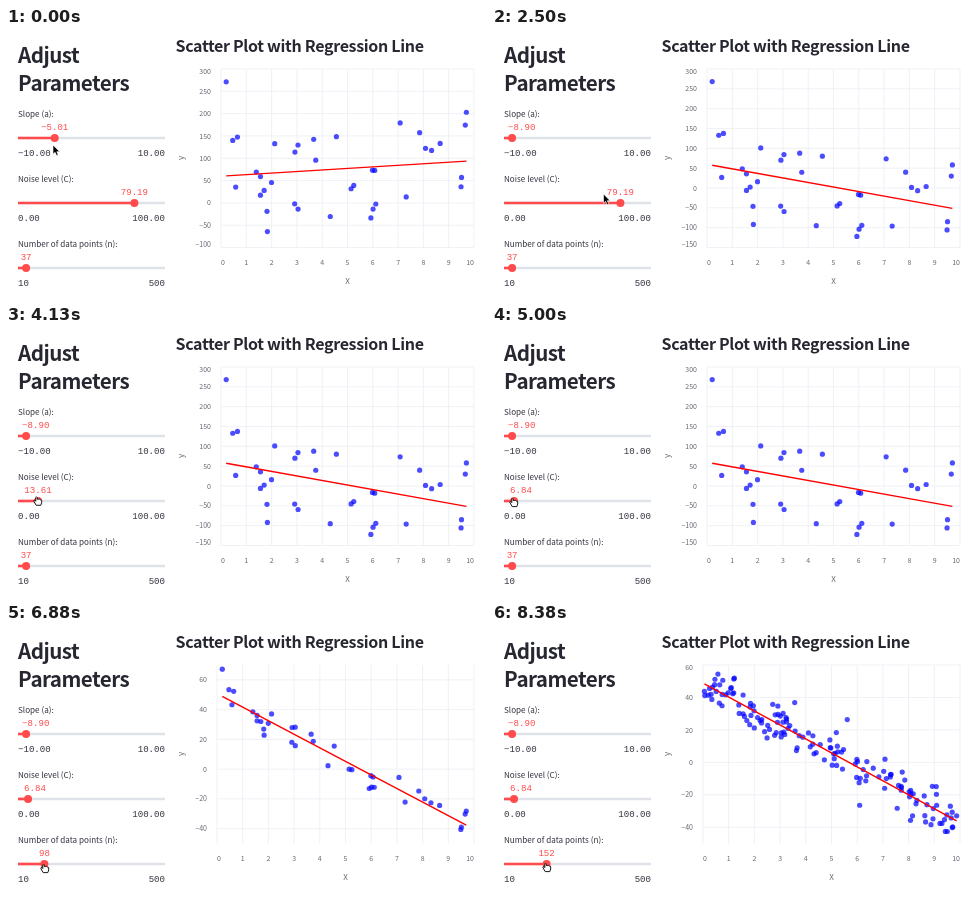
An HTML page that plays this animation: 480x270 px, repeating every 9010 ms.

```html
<!DOCTYPE html>
<html lang="en">
<head>
<meta charset="utf-8">
<title>Scatter Plot with Regression Line</title>
<style>
  html, body { margin: 0; width: 100%; height: 100%; overflow: hidden; background: #fff; }
  svg { display: block; width: 480px; height: 270px; }
  text { font: 8.15px "Noto Sans CJK JP", "Noto Sans CJK SC", "Noto Sans CJK", sans-serif; fill: #31333f; }
  .heading { font-size: 20.6px; font-weight: 700; letter-spacing: -.025em; fill: #262730; }
  .title { font-size: 16px; font-weight: 700; letter-spacing: -.02em; fill: #262730; }
  .mono { font: 9.1px "Liberation Mono", monospace; }
  .value { fill: #ff4b4b; }
  .tick { font-size: 7px; fill: #666975; }
  .name { font-size: 8.1px; fill: #666975; }
</style>
</head>
<body>
<svg viewBox="0 0 480 270">
  <text class="heading" x="12" y="35">Adjust</text>
  <text class="heading" x="12" y="63">Parameters</text>
  <text class="title" x="169.5" y="24">Scatter Plot with Regression Line</text>
  <g id="chart"></g>
  <g id="sliders"></g>
  <g id="cursor"></g>
</svg>
<script>
const LOOP = 9010, STEP = 125;
const TOP = 41, BOTTOM = 219.5, RIGHT = 468;
const TRACK_LEFT = 12, TRACK_WIDTH = 147, THUMB = 4, CHAR = 5.46;

// Keys are [time, value...]
const slopeKeys = [[0, -5.01], [500, -8.63], [1250, -8.63], [1500, -8.9]];
const noiseKeys = [[3000, 79.19], [3500, 44.78], [4000, 17], [4375, 6.84]];
const countKeys = [[6125, 37], [6750, 98], [6875, 98], [7250, 152]];
const cursorKeys = [
  [0, 47, 117], [500, 22, 114], [1250, 22, 114], [1500, 20, 114], [1875, 22, 115], [2000, 29, 117],
  [2500, 111.5, 166], [2875, 128, 171], [3000, 128, 171], [3500, 77, 171], [4000, 37, 174],
  [4375, 22, 176], [5250, 22, 176], [5875, 20, 242], [6125, 20, 243], [6750, 39, 244],
  [6875, 39, 244], [7250, 55, 243]
];
// The chart lags behind the sliders: [time, slope, noise, count]
const charts = [
  [0, 6.04, 79.19, 37], [1125, -8.63, 79.19, 37], [2250, -8.9, 79.19, 37],
  [5250, -8.9, 6.84, 37], [7500, -8.9, 6.84, 98], [8250, -8.9, 6.84, 152]
];

function tween(keys, t) {
  const i = keys.findIndex(key => key[0] > t);
  if (i === 0) return keys[0].slice(1);
  if (i < 0) return keys[keys.length - 1].slice(1);
  const a = keys[i - 1], b = keys[i], p = (t - a[0]) / (b[0] - a[0]);
  return a.slice(1).map((v, k) => v + (b[k + 1] - v) * p);
}

const text = (x, y, str, cls = '', anchor = 'start') =>
  `<text x="${x}" y="${y}" class="${cls}" text-anchor="${anchor}">${str}</text>`;
const line = (x1, y1, x2, y2, stroke, width) =>
  `<line x1="${x1}" y1="${y1}" x2="${x2}" y2="${y2}" stroke="${stroke}" stroke-width="${width}"/>`;
const minus = str => String(str).replace('-', '−');

// Mersenne Twister giving doubles in [0, 1)
function mersenne(seed) {
  const s = [seed];
  for (let i = 1; i < 624; i++)
    s[i] = (Math.imul(1812433253, s[i - 1] ^ (s[i - 1] >>> 30)) + i) >>> 0;
  let k = 0;
  const next = () => {
    let y = (s[k] & 0x80000000) | (s[(k + 1) % 624] & 0x7fffffff);
    y = s[k] = s[(k + 397) % 624] ^ (y >>> 1) ^ (y & 1 ? 0x9908b0df : 0);
    k = (k + 1) % 624;
    y ^= y >>> 11;
    y ^= (y << 7) & 0x9d2c5680;
    y ^= (y << 15) & 0xefc60000;
    return (y ^ (y >>> 18)) >>> 0;
  };
  return () => ((next() >>> 5) * 67108864 + (next() >>> 6)) / 9007199254740992;
}

// Normal deviates by the polar method, two per accepted pair
function gaussian(random) {
  let spare = null;
  return () => {
    if (spare !== null) { const v = spare; spare = null; return v; }
    let a, b, r;
    do {
      a = 2 * random() - 1;
      b = 2 * random() - 1;
      r = a * a + b * b;
    } while (r >= 1 || r === 0);
    const f = Math.sqrt(-2 * Math.log(r) / r);
    spare = f * a;
    return f * b;
  };
}

function samples(slope, noise, count) {
  const random = mersenne(42), normal = gaussian(random);
  const xs = Array.from({ length: count }, () => 10 * random());
  return xs.map(x => [x, slope * x + 50 + noise * normal()]);
}

function regression(points) {
  const mean = k => points.reduce((sum, p) => sum + p[k], 0) / points.length;
  const mx = mean(0), my = mean(1);
  let sxy = 0, sxx = 0;
  for (const [x, y] of points) { sxy += (x - mx) * (y - my); sxx += (x - mx) ** 2; }
  return x => my + (x - mx) * sxy / sxx;
}

function tickStep(span, count) {
  const raw = span / count, power = 10 ** Math.floor(Math.log10(raw)), e = raw / power;
  return power * (e >= Math.sqrt(50) ? 10 : e >= Math.sqrt(10) ? 5 : e >= Math.sqrt(2) ? 2 : 1);
}

function drawChart([, slope, noise, count]) {
  const points = samples(slope, noise, count), fit = regression(points);
  const xs = points.map(p => p[0]), ys = points.map(p => p[1]);
  const min = Math.min(...ys), max = Math.max(...ys), nice = tickStep(max - min, 10);
  const lo = Math.floor(min / nice) * nice, hi = Math.ceil(max / nice) * nice;
  const left = lo <= -100 ? 215 : 211;
  const px = x => left + x / 10 * (RIGHT - left);
  const py = y => BOTTOM - (y - lo) / (hi - lo) * (BOTTOM - TOP);
  let grid = '', labels = '';
  for (let x = 0; x <= 10; x++) {
    grid += line(px(x), TOP, px(x), BOTTOM, '#e6eaf1', .65);
    labels += text(px(x), 236.5, x, 'tick', x === 0 ? 'start' : x === 10 ? 'end' : 'middle');
  }
  const step = tickStep(hi - lo, 7);
  for (let y = Math.ceil(lo / step) * step; y <= hi; y += step) {
    grid += line(left, py(y), RIGHT, py(y), '#e6eaf1', .65);
    const mid = Math.min(Math.max(py(y), TOP + 2.5), BOTTOM - 3.5);
    labels += text(left - 10, mid + 2.6, minus(y), 'tick', 'end');
  }
  const dots = points.map(([x, y]) => `<circle cx="${px(x)}" cy="${py(y)}" r="2.6"/>`).join('');
  const x1 = Math.min(...xs), x2 = Math.max(...xs);
  return grid + labels +
    text((left + RIGHT) / 2, 255.5, 'X', 'name', 'middle') +
    `<g transform="translate(177.5 130) rotate(-90)">${text(0, 0, 'y', 'name', 'middle')}</g>` +
    `<g fill="#00f" fill-opacity=".7">${dots}</g>` +
    line(px(x1), py(fit(x1)), px(x2), py(fit(x2)), '#f00', 1.4);
}

function drawSlider(y, label, value, min, max, digits) {
  const thumb = TRACK_LEFT + TRACK_WIDTH * (value - min) / (max - min);
  const shown = minus(value.toFixed(digits)), half = shown.length * CHAR / 2;
  const start = thumb - half < TRACK_LEFT ? thumb - THUMB : thumb - half;
  const end = TRACK_LEFT + TRACK_WIDTH;
  return text(TRACK_LEFT, y - 21, label) +
    text(start, y - 8, shown, 'mono value') +
    line(TRACK_LEFT, y, end, y, '#e0e2ea', 2.6) +
    line(TRACK_LEFT, y, thumb, y, '#ff4b4b', 2.6) +
    `<circle cx="${thumb}" cy="${y}" r="${THUMB}" fill="#ff4b4b"/>` +
    text(TRACK_LEFT, y + 18, minus(min.toFixed(digits)), 'mono') +
    text(end, y + 18, max.toFixed(digits), 'mono', 'end');
}

const ARROW = '<path d="M0 0V9.2L2.1 7.3L3.6 10.6L5.2 9.9L3.8 6.7H6.6Z" fill="#000" stroke="#fff" stroke-width=".6"/>';
const HAND = '<path d="M-1.8 4.6L-4 .8Q-4.6-.6-3.2-.4L-2.2 .6V-3.2Q-1.5-4.6-.8-3.2V-1.4Q0-2.4 .8-1.3Q1.6-2 2.3-.9Q3.4-1.3 3.7 0V2L2.8 4.6Z" fill="#fff" stroke="#000" stroke-width=".9" stroke-linejoin="round"/>';

const layer = id => document.getElementById(id);
const chartMarkup = charts.map(drawChart);
let shownStep = -1, shownChart = -1;

function render(now) {
  const step = Math.floor(now % LOOP / STEP), t = step * STEP;
  if (step !== shownStep) {
    shownStep = step;
    const index = charts.filter(c => c[0] <= t).length - 1;
    if (index !== shownChart) layer('chart').innerHTML = chartMarkup[shownChart = index];
    layer('sliders').innerHTML =
      drawSlider(110, 'Slope (a):', tween(slopeKeys, t)[0], -10, 10, 2) +
      drawSlider(175, 'Noise level (C):', tween(noiseKeys, t)[0], 0, 100, 2) +
      drawSlider(240, 'Number of data points (n):', tween(countKeys, t)[0], 10, 500, 0);
    const [x, y] = tween(cursorKeys, t);
    const overThumb = t >= 2875 && (t <= 5250 || t >= 5875);
    layer('cursor').innerHTML = `<g transform="translate(${x} ${y})">${overThumb ? HAND : ARROW}</g>`;
  }
  requestAnimationFrame(render);
}
requestAnimationFrame(render);
</script>
</body>
</html>
```
